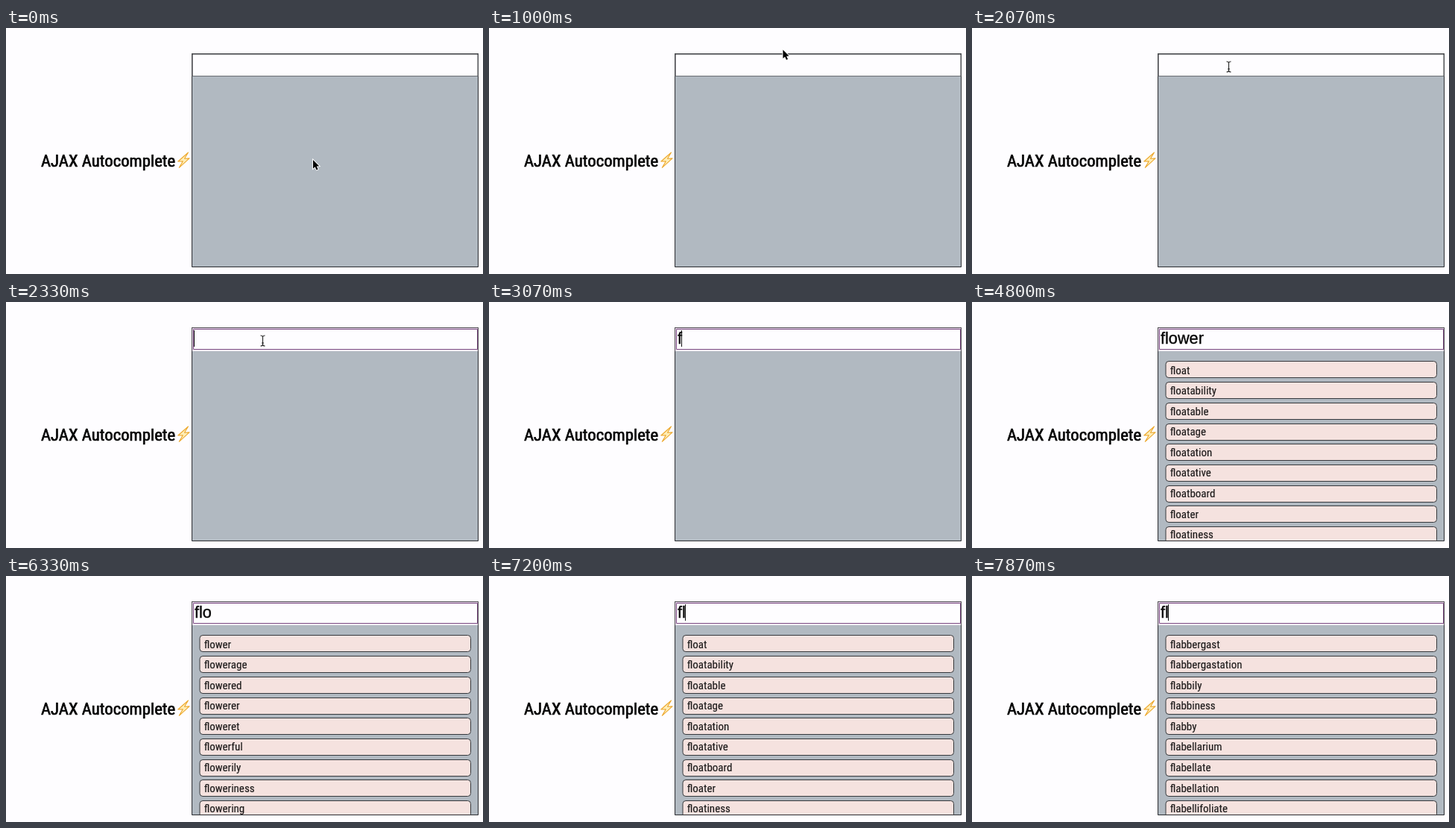
Write an HTML page with a canvas that moves like this. It is 640 px wide and 330 px high and loops after 8 s.

```html
<!DOCTYPE html>
<html lang="en">
<head>
<meta charset="utf-8">
<title>AJAX Autocomplete</title>
<style>
  html, body { margin: 0; width: 100%; height: 100%; overflow: hidden; background: #fefdff; }
  canvas { display: block; width: 640px; height: 330px; }
</style>
</head>
<body>
<canvas id="stage" width="640" height="330"></canvas>
<script>
const ctx = document.getElementById('stage').getContext('2d');
const LOOP = 8000;
const FPS = 15;
const INK = '#2b2d31';

const WORDS = {
  flo: 'float floatability floatable floatage floatation floatative floatboard floater floatiness',
  flow: 'flow flowable flowage flower flowerage flowered flowerer floweret flowerful',
  flower: 'flower flowerage flowered flowerer floweret flowerful flowerily floweriness flowering',
  fl: 'flabbergast flabbergastation flabbily flabbiness flabby flabellarium flabellate flabellation flabellifoliate'
};

// Each track is a list of [start time, value] steps.
const TYPED = [[0, ''], [3070, 'f'], [3200, 'fl'], [3400, 'flo'], [3530, 'flow'], [3670, 'flowe'],
  [3870, 'flower'], [5800, 'flowe'], [6000, 'flow'], [6200, 'flo'], [7200, 'fl']];
const RESULTS = [[0, ''], [4800, 'flo'], [4930, 'flow'], [5330, 'flower'], [6530, 'flow'],
  [6730, 'flo'], [7730, 'fl']];
const CARET = [[0, false], [2330, true], [2800, false], [3070, true], [4330, false], [4870, true],
  [5400, false], [5800, true], [5930, false], [6000, true], [6330, false], [6870, true],
  [7330, false], [7870, true]];
const FOCUS_AT = 2330;
const HIDE_POINTER_AT = 3070;

// Pointer moves: start, end, from x, from y, to x, to y
const MOVES = [
  [0, 533, 412, 177, 398, 27],
  [933, 1200, 398, 27, 375, 42],
  [1467, 1733, 375, 42, 346, 52],
  [1867, 2067, 346, 52, 344.5, 52]
];

function at(track, t) {
  let value = track[0][1];
  for (const [start, v] of track) if (t >= start) value = v;
  return value;
}

function pointerAt(t) {
  const tick = Math.floor(t * FPS / 1000 + 0.1) * 1000 / FPS;
  let pos = [412, 177];
  for (const [a, b, x0, y0, x1, y1] of MOVES) {
    if (tick < a) break;
    const p = Math.min(1, (tick - a) / (b - a));
    const e = p * p * (3 - 2 * p);
    pos = [x0 + (x1 - x0) * e, y0 + (y1 - y0) * e];
  }
  return pos;
}

const condensed = size => `condensed ${size}px "Roboto Condensed", Roboto, sans-serif`;
ctx.font = condensed(15);
// Narrow the regular face when no condensed one is present.
const squeeze = ctx.measureText('flabbergastation').width > 103 ? 0.885 : 1;

// Fills text and thickens it with a thin outline.
function boldText(text, x, y, weight) {
  ctx.fillText(text, x, y);
  if (!weight) return;
  ctx.strokeStyle = ctx.fillStyle;
  ctx.lineWidth = weight;
  ctx.lineJoin = 'round';
  ctx.strokeText(text, x, y);
}

function narrowText(text, x, y, size, color, weight) {
  ctx.save();
  ctx.translate(x, y);
  ctx.scale(squeeze, 1);
  ctx.font = condensed(size);
  ctx.fillStyle = color;
  boldText(text, 0, 0, weight);
  ctx.restore();
}

function rect(x, y, w, h, color) {
  ctx.fillStyle = color;
  ctx.fillRect(x, y, w, h);
}

function frame(x, y, w, h, color) {
  ctx.strokeStyle = color;
  ctx.lineWidth = 1;
  ctx.strokeRect(x, y, w, h);
}

function polygon(points) {
  ctx.beginPath();
  points.forEach(([x, y]) => ctx.lineTo(x, y));
  ctx.closePath();
}

function drawLabel() {
  narrowText('AJAX Autocomplete', 47, 186, 22.75, '#050505', 0.7);
  polygon([[244.5, 167], [230.8, 179], [237.3, 178.8], [232.3, 187.3], [246, 174.9], [239.5, 175.2]]);
  ctx.fillStyle = '#ffeeb8';
  ctx.strokeStyle = '#eda92f';
  ctx.lineWidth = 1.1;
  ctx.lineJoin = 'round';
  ctx.fill();
  ctx.stroke();
}

function drawResults(key) {
  if (!key) return;
  ctx.save();
  ctx.beginPath();
  ctx.rect(250, 66, 383, 255);
  ctx.clip();
  WORDS[key].split(' ').forEach((word, i) => {
    ctx.beginPath();
    ctx.roundRect(260, Math.floor(79.9 + i * 27.7) + 0.5, 363.5, 22, 4);
    ctx.fillStyle = '#f5e2df';
    ctx.fill();
    ctx.strokeStyle = '#35383c';
    ctx.lineWidth = 1;
    ctx.stroke();
    narrowText(word, 265.7, Math.floor(97 + i * 27.58), 15, '#1c1a1a', 0.15);
  });
  ctx.restore();
}

function drawInput(text, focused, caret) {
  rect(250, 35, 383, focused ? 31 : 29, '#fefdff');
  if (focused) {
    frame(250.5, 35.5, 382, 29.5, '#ecdcef');
    rect(249, 34, 385, 1, '#4d4850');
    rect(249, 34, 1, 32, '#4d4850');
    rect(633, 34, 1, 32, '#4d4850');
    frame(251.5, 36.5, 381, 27, '#7b4a82');
  } else {
    rect(249, 34, 385, 1.6, '#45474a');
    rect(249, 34, 1.6, 31, '#45474a');
    rect(632.6, 34, 1.4, 31, '#45474a');
    rect(250, 64, 383, 1, '#6a6e73');
  }
  ctx.font = '21.7px "Liberation Sans", Arial, sans-serif';
  ctx.fillStyle = '#080808';
  boldText(text, 253, 56, 0.4);
  if (caret) rect(Math.floor(252.9 + ctx.measureText(text).width), 38, 1, 22, '#111');
}

function drawArrow(x, y) {
  ctx.save();
  ctx.translate(x, y);
  polygon([[0, 0], [0, 11.5], [2.7, 9.2], [4.6, 13.4], [6.6, 12.5], [4.7, 8.4], [8.2, 8.2]]);
  ctx.lineWidth = 1.8;
  ctx.lineJoin = 'miter';
  ctx.strokeStyle = '#fff';
  ctx.stroke();
  ctx.fillStyle = '#000';
  ctx.fill();
  ctx.restore();
}

function drawBeam(x, y) {
  ctx.beginPath();
  for (const side of [-1, 1]) {
    ctx.moveTo(x - 3, y + 7 * side);
    ctx.quadraticCurveTo(x, y + 7 * side, x, y + 5 * side);
    ctx.quadraticCurveTo(x, y + 7 * side, x + 3, y + 7 * side);
  }
  ctx.moveTo(x, y - 6);
  ctx.lineTo(x, y + 6);
  ctx.moveTo(x - 1.5, y + 3);
  ctx.lineTo(x + 1.5, y + 3);
  ctx.lineWidth = 1.1;
  ctx.strokeStyle = '#222';
  ctx.stroke();
}

function draw(t) {
  rect(0, 0, 640, 330, '#fefdff');
  drawLabel();
  rect(249, 34, 385, 287, '#b1b9c1');
  drawResults(at(RESULTS, t));
  frame(249.5, 34.5, 384, 286, INK);
  drawInput(at(TYPED, t), t >= FOCUS_AT, at(CARET, t));
  if (t < HIDE_POINTER_AT) {
    const [x, y] = pointerAt(t);
    const overInput = y > 34 && y < 64;
    (overInput ? drawBeam : drawArrow)(x, y);
  }
}

const start = performance.now();
function tick(now) {
  draw(Math.max(0, now - start) % LOOP);
  requestAnimationFrame(tick);
}
draw(0);
requestAnimationFrame(tick);
</script>
</body>
</html>
```
